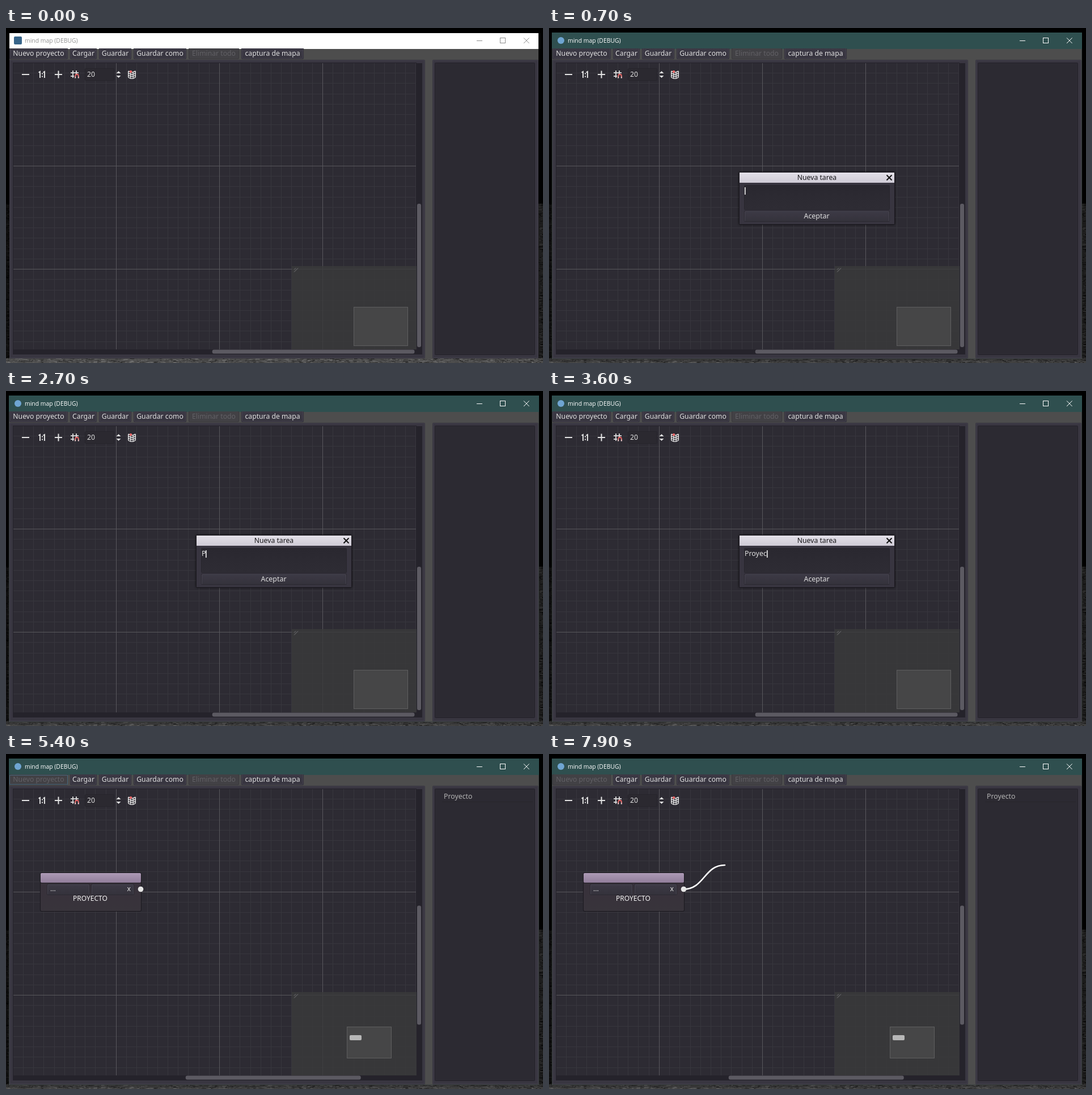
An HTML page with a canvas for the animation above (8000 ms loop, 947 by 591 pixels).

```html
<!DOCTYPE html>
<html lang="es">
<head>
<meta charset="utf-8">
<title>mind map</title>
<style>
html, body { margin: 0; width: 100%; height: 100%; overflow: hidden; background: #000; }
canvas { display: block; }
</style>
</head>
<body>
<canvas id="stage" width="947" height="591"></canvas>
<script>
const ctx = document.getElementById('stage').getContext('2d');
const UI = '"Noto Sans", sans-serif';
const TITLE = '"Open Sans", sans-serif';
const LOOP = 8000;
const TICK = 100;
const CELL = 18.21;
const BLINK = 625;
const KEY_GAP = 80;

const T = {
  active: 500, dialog: 700, hoverOk: 1200, leaveOk: 1300, click: 1700,
  created: 5400, hoverX: 6800, leaveX: 7300, drag: 7700
};
const WORD = 'Proyecto';
const BURSTS = { P: 2570, ro: 2970, yec: 3370, to: 3870 };
const KEYS = Object.entries(BURSTS).flatMap(([s, at]) => [...s].map((_, i) => at + i * KEY_GAP));

const MENU = {
  'Nuevo proyecto': 6, 'Cargar': 113, 'Guardar': 164,
  'Guardar como': 225, 'Eliminar todo': 322, 'captura de mapa': 415
};
const MENU_END = 529;

const within = (t, a, b) => t >= a && t < b;
const range = n => [...Array(n).keys()];

function rect(x, y, w, h, fill) {
  ctx.fillStyle = fill;
  ctx.fillRect(x, y, w, h);
}

function frame(x, y, w, h, color) {
  ctx.strokeStyle = color;
  ctx.lineWidth = 1;
  ctx.strokeRect(x + 0.5, y + 0.5, w - 1, h - 1);
}

function rounded(x, y, w, h, r, fill) {
  ctx.fillStyle = fill;
  ctx.beginPath();
  ctx.roundRect(x, y, w, h, r);
  ctx.fill();
}

function disc(x, y, r, fill) {
  rounded(x - r, y - r, 2 * r, 2 * r, r, fill);
}

function fade(y, h, top, bottom) {
  const g = ctx.createLinearGradient(0, y, 0, y + h);
  g.addColorStop(0, top);
  g.addColorStop(1, bottom);
  return g;
}

function text(s, x, y, { color = '#e0e0e0', size = 12.2, family = UI, align = 'left' } = {}) {
  ctx.font = `${size}px ${family}`;
  ctx.textAlign = align;
  ctx.fillStyle = color;
  ctx.fillText(s, x, y);
}

function line(color, width, x, y, ...rest) {
  ctx.strokeStyle = color;
  ctx.lineWidth = width;
  ctx.beginPath();
  ctx.moveTo(x, y);
  for (let i = 0; i < rest.length; i += 2) ctx.lineTo(rest[i], rest[i + 1]);
  ctx.stroke();
}

function cross(x, y, r, width, color) {
  line(color, width, x - r, y - r, x + r, y + r);
  line(color, width, x + r, y - r, x - r, y + r);
}

function triangle(x, y, half, height) {
  ctx.fillStyle = '#e0e0e0';
  ctx.beginPath();
  ctx.moveTo(x - half, y);
  ctx.lineTo(x + half, y);
  ctx.lineTo(x, y + height);
  ctx.fill();
}

function button(x, y, w, h, hover) {
  rounded(x, y, w, h, 2, '#2b2931');
  rounded(x + 1, y + 1, w - 2, h - 2, 1.5, hover ? '#57535f' : '#474450');
  rect(x + 2, y + 2, w - 4, h - 3,
    hover ? fade(y, h, '#4c4856', '#443f4d') : fade(y, h, '#3d3a46', '#34323b'));
}

// Rocky wallpaper that shows only around the window edges.
function wallpaper(active) {
  rect(0, 0, 947, 591, '#000');
  let seed = 7;
  const rnd = () => (seed = (seed * 16807) % 2147483647) / 2147483647;
  const rock = (x, y, w, h, base, span) => {
    rect(x, y, w, h, `rgb(${base},${base},${base})`);
    for (let i = 0; i < w * h / 6; i++) {
      const v = Math.max(0, base + (rnd() - 0.5) * span) | 0;
      rect(x + rnd() * w, y + rnd() * h, 1 + rnd() * Math.min(w, 7), 1, `rgb(${v},${v},${v})`);
    }
  };
  rock(0, 310, 6, 273, 14, 35);
  rock(939, 310, 8, 273, 28, 50);
  rock(0, 583, 947, 8, 76, 90);
  if (active) rect(0, 583, 947, 8, fade(583, 8, 'rgba(0,0,0,.4)', 'rgba(0,0,0,.12)'));
}

function titleBar(active) {
  const fg = active ? '#fff' : '#8c8c8c';
  if (active) {
    rect(5, 8, 935, 29, '#2f4f4f');
    disc(21, 22, 6, '#6fa5d2');
  } else {
    rect(6, 9, 933, 28, '#fff');
    rounded(14, 15, 14, 14, 2, '#376489');
  }
  text('mind map (DEBUG)', 33, 26, { color: active ? '#fff' : '#929292', size: 10.4, family: TITLE });
  line(fg, 1, 830, 22.5, 840, 22.5);
  frame(871, 17, 10, 10, fg);
  cross(917.8, 22.2, 4.8, 1, fg);
}

function menu(t) {
  const starts = [...Object.values(MENU), MENU_END];
  Object.keys(MENU).forEach((label, i) => {
    const x = starts[i], w = starts[i + 1] - x - 4;
    const pressed = i === 0 && within(t, T.active, T.dialog);
    const disabled = label === 'Eliminar todo' || (i === 0 && t >= T.created);
    ctx.save();
    ctx.beginPath();
    ctx.rect(x, 36, w, 19);
    ctx.clip();
    if (disabled) {
      rounded(x, 35, w, 20, 2, '#3a393d');
      rounded(x + 1, 36, w - 2, 18, 2, '#424145');
    } else if (pressed) {
      rounded(x, 36, w, 19, 2, '#1d1d25');
    } else {
      rounded(x, 34, w, 21, 2, '#32303a');
      rounded(x + 1, 35, w - 2, 19, 2, '#45424e');
      rect(x + 2, 36, w - 4, 17, fade(36, 18, '#3c3945', '#36343e'));
    }
    if (i === 0 && (pressed || within(t, T.created, T.drag))) frame(x, 37, w, 17, '#466579');
    ctx.restore();
    text(label, x + w / 2, 49, { color: disabled ? '#626166' : pressed ? '#fff' : '#e0e0e0', align: 'center' });
  });
}

function panel(x, w) {
  rounded(x, 56, w, 527, 2, '#37353f');
  frame(x + 1, 57, w - 2, 525, '#413e4a');
  rect(x + 3, 59, w - 6, 520, '#393641');
}

function grid() {
  rect(12, 61, 712, 506, '#2d2b33');
  for (const major of [false, true]) {
    const color = major ? '#58575c' : '#37363d';
    for (const i of range(40).filter(n => (n % 10 === 0) === major)) {
      const x = Math.floor(12.3 + i * CELL), y = Math.floor(61.4 + i * CELL);
      if (x < 724) rect(x, 61, 1, 506, color);
      if (y < 567) rect(12, y, 712, 1, color);
    }
  }
  frame(12, 61, 712, 507, '#24222a');
}

function snapIcon(x, y, fg) {
  for (const d of [-3, 3]) {
    line(fg, 1.7, x + d, y - 7, x + d, y + (d < 0 ? 6 : -1));
    line(fg, 1.7, x - 7, y + d, x + (d < 0 ? 7 : -1), y + d);
  }
  ctx.strokeStyle = '#f06a6a';
  ctx.lineWidth = 2;
  ctx.beginPath();
  ctx.arc(x + 4, y + 2.5, 2.8, Math.PI, 0);
  ctx.stroke();
  for (const d of [1.2, 6.8]) rect(x + d - 1, y + 2.5, 2, 4, fade(y + 2, 5, '#f06a6a', '#fff'));
}

function mapIcon(x, y, fg) {
  for (const i of range(4)) {
    const dx = (i - 1.5) * 4.2, dip = i % 3 ? 2 : 0;
    line(fg, 1.4, x + dx, y - 6 + dip, x + dx, y + 5 + dip);
    const dy = y - 6 + i * 3.7;
    line(fg, 1.4, x - 6.3, dy, x - 2.1, dy + 2, x + 2.1, dy + 2, x + 6.3, dy);
  }
  disc(x - 2, y - 5, 2.2, '#f06a6a');
}

function tools() {
  const fg = '#e4e4e4';
  line(fg, 2, 28, 82, 41, 82);
  line(fg, 2, 86, 82, 99, 82);
  line(fg, 2, 92.5, 75.5, 92.5, 88.5);
  for (const x of [60, 68]) line(fg, 1.9, x - 2.5, 78.5, x, 77, x, 88);
  for (const y of [79.5, 84.5]) rect(63, y, 2, 2, fg);
  snapIcon(121, 82, fg);

  rounded(139, 71, 52, 22, 2, '#26242b');
  rect(140, 72, 50, 20, '#2b2930');
  text('20', 143, 86);
  triangle(198.5, 80, 4, -4);
  triangle(198.5, 84, 4, 4);
  mapIcon(222, 82, fg);
}

function scrollBars(created) {
  rect(724, 62, 10, 514, '#25232b');
  rect(12, 567, 712, 9, '#25232b');
  const [down, tall] = created ? [0.406, 0.415] : [0.49, 0.5];
  const [right, wide] = created ? [0.428, 0.434] : [0.494, 0.501];
  rounded(725, 62 + 506 * down, 7, 506 * tall, 3, '#5c5a62');
  rounded(12 + 712 * right, 567.5, 712 * wide, 7, 3, '#5c5a62');
}

function minimap(created) {
  rect(504, 420, 220, 147, 'rgba(58,58,59,.82)');
  line('#77777a', 1, 508, 430.5, 515, 423.5);
  line('#77777a', 1, 508, 426.5, 511, 423.5);
  const [x, y, w] = created ? [601, 481, 79] : [613, 492, 96];
  const h = Math.round(w * 0.715);
  rect(x, y, w, h, '#464647');
  frame(x, y, w, h, '#5e5e5f');
  if (created) rounded(606, 496, 21, 9, 2, '#b7b7b7');
}

function wire(x, y, k) {
  const dx = 72.5 * k, dy = -42.5 * Math.pow(k, 1.2);
  ctx.strokeStyle = '#fff';
  ctx.lineWidth = 2.6;
  ctx.lineCap = 'round';
  ctx.beginPath();
  ctx.moveTo(x, y);
  ctx.bezierCurveTo(x + dx / 2, y, x + dx / 2, y + dy, x + dx, y + dy);
  ctx.stroke();
  ctx.lineCap = 'butt';
}

function node(t) {
  rounded(60, 209, 179, 69, 3, '#1b191f');
  rounded(61, 210, 177, 67, 2, fade(228, 49, '#38313b', '#38343b'));
  rounded(61, 210, 177, 17, 2, fade(210, 17, '#ad9ab5', '#917e9b'));
  rect(61, 227, 177, 1, '#211e24');
  button(72, 229, 76, 20);
  button(150, 229, 76, 20, within(t, T.hoverX, T.leaveX));
  text('...', 78, 242);
  text('x', 213.5, 242);
  text(WORD.toUpperCase(), 148.5, 258.5, { color: '#f4f4f4', size: 12, align: 'center' });
  if (t >= T.drag) wire(237.5, 238.5, Math.min(1, (t - T.drag + TICK) / (3 * TICK)));
  disc(237.5, 238.5, 4.8, '#e6e6e6');
}

function caretVisible(t) {
  const last = Math.max(...[T.dialog, T.click, ...KEYS].filter(k => k <= t));
  return (t - last) % (2 * BLINK) < BLINK;
}

function dialog(t) {
  ctx.save();
  ctx.shadowColor = 'rgba(0,0,0,.6)';
  ctx.shadowBlur = 4;
  rounded(335, 254, 275, 93, 2, '#1a181e');
  ctx.restore();
  rect(336, 255, 273, 91, '#383540');
  rect(336, 255, 273, 18, fade(255, 18, '#e3e0e8', '#cfcbd6'));
  text('Nueva tarea', 472.5, 268, { color: '#161518', align: 'center' });
  cross(600, 264, 4.5, 2, '#111');

  rounded(344, 277, 257, 44, 2, '#27252c');
  rect(345, 278, 255, 42, fade(278, 42, '#2a2830', '#2e2c34'));
  const typed = WORD.slice(0, KEYS.filter(k => k <= t).length);
  text(typed, 345, 291, { size: 12.4 });
  if (caretVisible(t)) rect(345 + Math.round(ctx.measureText(typed).width), 281, 1.6, 13, '#f2f2f2');
  button(344, 322, 257, 20, within(t, T.hoverOk, T.leaveOk));
  text('Aceptar', 472, 336, { size: 12.4, align: 'center' });
}

function draw(t) {
  const active = t >= T.active, created = t >= T.created;
  wallpaper(active);
  rect(6, 36, 933, 547, '#4d4d4d');
  if (active) frame(5, 8, 935, 576, '#3c4242');
  titleBar(active);
  menu(t);
  panel(6, 733);
  panel(752, 187);
  rounded(756, 61, 177, 516, 2, '#24222a');
  rect(757, 62, 175, 514, '#2c2a32');
  grid();
  if (created) {
    node(t);
    text(WORD, 772, 79, { color: '#b3b3b3', size: 12.3 });
    rect(769, 84, 160, 1, '#27252c');
  }
  minimap(created);
  scrollBars(created);
  tools();
  if (within(t, T.dialog, T.created)) dialog(t);
}

const start = performance.now();
function tick() {
  const t = (performance.now() - start) % LOOP;
  draw(Math.floor(t / TICK) * TICK);
  requestAnimationFrame(tick);
}
tick();
</script>
</body>
</html>
```
